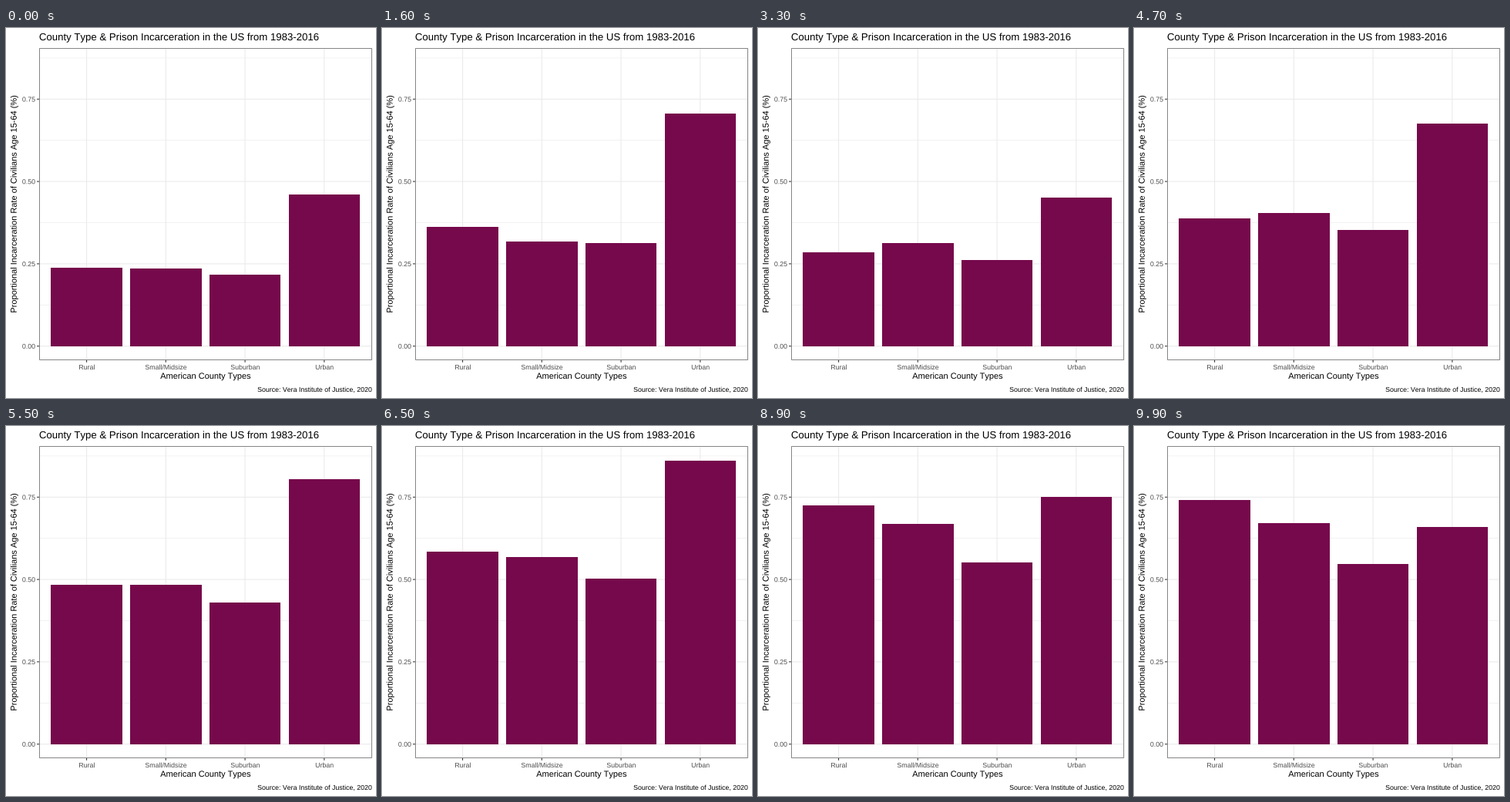
A matplotlib script that plays this animation: 480 px wide and 480 px high, repeating every 10 s.

```python
import matplotlib.pyplot as plt
import numpy as np
from matplotlib.animation import FuncAnimation
from matplotlib.patches import PathPatch, Rectangle
from matplotlib.textpath import TextPath
from matplotlib.transforms import Affine2D

plt.rcParams["font.family"] = "Liberation Sans"
plt.rcParams["text.kerning_factor"] = 6  # practically no kerning

SIZE, DPI = 480, 96
PX = 72 / DPI  # points per pixel
FRAMES, INTERVAL = 100, 100

LEFT, RIGHT, TOP, BOTTOM = 42.9, 474.5, 26.5, 431.0
ZERO, UNIT = 412.7, 427.2
STEP = (RIGHT - LEFT) / 4.2
MIDDLE = (LEFT + RIGHT) / 2

BAR, GRID, DARK, LABEL = "#76094b", "#ebebeb", "#333333", "#4d4d4d"

# turning points of the rates; bars move straight between them
TURNS = [0, 12, 16, 22, 27, 47, 56, 65, 78, 99]
RATES = {
    "Rural": [.239, .37, .362, .35, .241, .388, .495, .584, .706, .742],
    "Small/Midsize": [.236, .32, .317, .33, .274, .404, .495, .568, .666, .671],
    "Suburban": [.217, .32, .313, .314, .224, .352, .44, .502, .559, .547],
    "Urban": [.461, .776, .706, .694, .355, .675, .82, .86, .851, .66],
}


def x_at(pos):
    return LEFT + (pos - 0.4) * STEP


def y_at(value):
    return ZERO - value * UNIT


def line(xs, ys, color, width):
    ax.plot(xs, ys, color=color, lw=width * PX, zorder=1,
            solid_capstyle="butt", snap=False)


def text(x, y, s, size, align=0.5, color="black", angle=0):
    """Draw s on the baseline y; align 0, 0.5, 1 is left, centre, right."""
    path = TextPath((0, 0), s, size=size)
    place = (Affine2D().translate(-align * path.get_extents().x1, 0)
             .scale(1, -1).rotate_deg(-angle).translate(x, y))
    ax.add_patch(PathPatch(place.transform_path(path), fc=color, lw=0,
                           snap=False, zorder=5))


fig = plt.figure(figsize=(SIZE / DPI, SIZE / DPI), dpi=DPI, facecolor="white")
ax = fig.add_axes([0, 0, 1, 1])
ax.set_xlim(0, SIZE)
ax.set_ylim(SIZE, 0)
ax.axis("off")

# grid, ticks and labels
for value in np.arange(0.125, 1, 0.25):
    line([LEFT, RIGHT], [y_at(value)] * 2, GRID, 0.6)
for value in np.arange(0, 1, 0.25):
    y = y_at(value)
    line([LEFT, RIGHT], [y, y], GRID, 1.1)
    line([LEFT - 2.75, LEFT], [y, y], DARK, 1.1)
    text(37.7, y + 3.2, f"{value:.2f}", 8.8, 1, LABEL)
for pos, name in enumerate(RATES, 1):
    x = x_at(pos)
    line([x, x], [TOP, BOTTOM], GRID, 1.1)
    line([x, x], [BOTTOM, BOTTOM + 2.75], DARK, 1.1)
    text(x, 443, name, 8.8, color=LABEL)

ax.add_patch(Rectangle((43.5, 26.5), 431, 404, fill=False, ec="#858585",
                       lw=PX, zorder=4, snap=False))

text(LEFT, 16, "County Type & Prison Incarceration in the US from 1983-2016",
     13.2, 0)
text(MIDDLE, 455, "American County Types", 11)
text(RIGHT, 472, "Source: Vera Institute of Justice, 2020", 8.8, 1)
text(13.7, (TOP + BOTTOM) / 2,
     "Proportional Incarceration Rate of Civilians Age 15-64 (%)",
     11, angle=90)

bars = []
for pos in range(1, len(RATES) + 1):
    x0, x1 = round(x_at(pos - 0.45)), round(x_at(pos + 0.45))
    bar = Rectangle((x0, 413), x1 - x0, 0, fc=BAR, ec="none", lw=0,
                    antialiased=False, zorder=3)
    bars.append(ax.add_patch(bar))


def update(step):
    for bar, rates in zip(bars, RATES.values()):
        top = round(y_at(np.interp(step, TURNS, rates)))
        bar.set_y(top)
        bar.set_height(413 - top)
    return bars


anim = FuncAnimation(fig, update, frames=FRAMES, interval=INTERVAL,
                     repeat=True, repeat_delay=0, blit=False)
plt.show()
```
